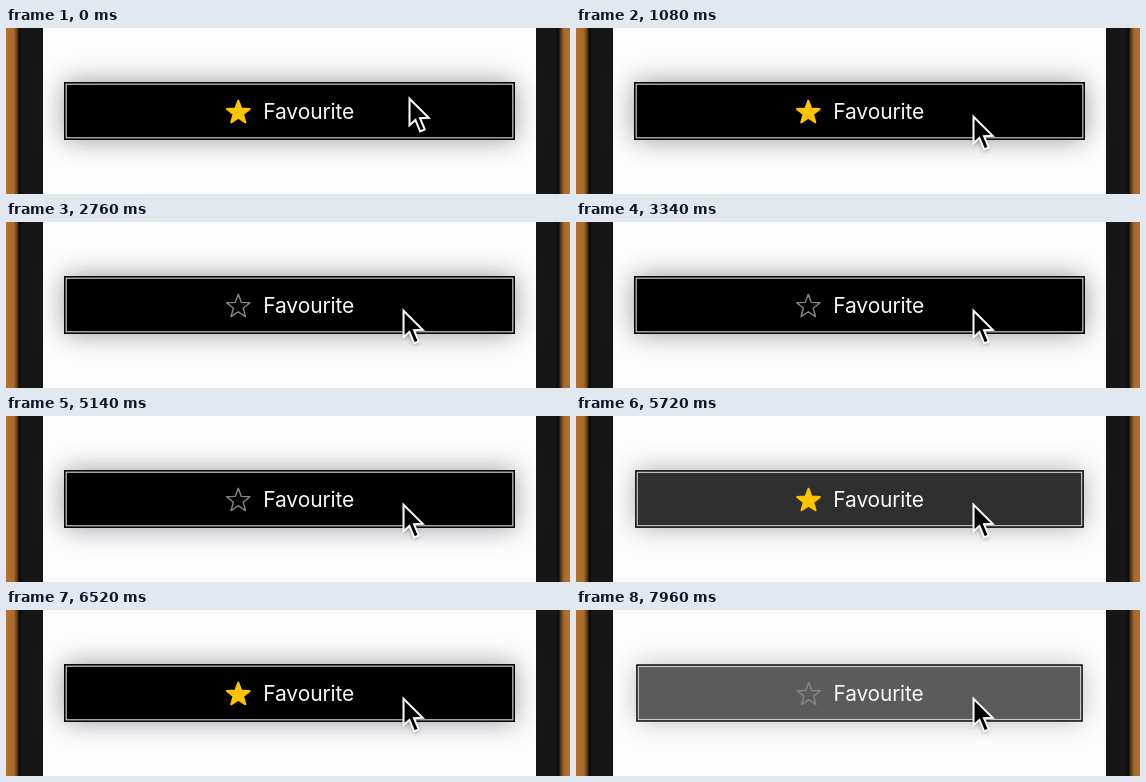
These frames come from a looping animation (564x166 px, 8 s). An HTML page with a canvas:

```html
<!DOCTYPE html>
<html lang="en">
<head>
<meta charset="utf-8">
<title>Favourite button</title>
<style>
  html, body { margin: 0; width: 100%; height: 100%; overflow: hidden; background: #fdfdfd; }
  canvas { display: block; width: 564px; height: 166px; }
</style>
</head>
<body>
<canvas id="stage"></canvas>
<script>
const W = 564, H = 166, LOOP = 8000;
const PAGE = '#fdfdfd', PALE = '#f8f8f8';
const FADE = 200;
const clicks = [
  { down: 2000, up: 2300 },
  { down: 5380, up: 5620 },
  { down: 7700, up: 7940 }
];
const button = { x: 58, y: 54, w: 451, h: 58 };
const arrow = [[1, 2.4], [1, 28.2], [6.7, 23], [11.3, 34.2], [15.8, 32.3], [11.2, 21.3], [19.6, 20.9]];

const canvas = document.getElementById('stage');
const ctx = canvas.getContext('2d');
const dpr = window.devicePixelRatio || 1;
canvas.width = Math.round(W * dpr);
canvas.height = Math.round(H * dpr);

const clamp = v => Math.max(0, Math.min(1, v));
const ease = v => { v = clamp(v); return v * v * (3 - 2 * v); };
const mix = (a, b, k) => a + (b - a) * k;

function pressAt(t) {
  return clicks.reduce((p, c) =>
    Math.max(p, ease((t - c.down) / FADE) - ease((t - c.up) / FADE)), 0);
}

function isFavourite(t) {
  return clicks.filter(c => t >= c.up).length % 2 === 0;
}

function rect(x, y, w, h, fill) {
  ctx.fillStyle = fill;
  ctx.fillRect(x, y, w, h);
}

function polygon(points) {
  ctx.beginPath();
  points.forEach(([x, y]) => ctx.lineTo(x, y));
  ctx.closePath();
}

function drawSides() {
  const strip = ctx.createLinearGradient(0, 0, 37, 0);
  strip.addColorStop(0, '#b4702c');
  strip.addColorStop(0.21, '#aa6a2a');
  strip.addColorStop(0.3, '#5c3a18');
  strip.addColorStop(0.36, '#0c0c0c');
  strip.addColorStop(0.46, '#161616');
  strip.addColorStop(1, '#161616');
  rect(0, 0, 37, H, strip);
  ctx.save();
  ctx.translate(W + 2, 0);
  ctx.scale(-1, 1);
  rect(0, 0, 36, H, strip);
  ctx.restore();
}

function drawStar(cx, cy, filled) {
  const r = filled ? 12 : 12.3;
  const points = Array.from({ length: 10 }, (_, i) => {
    const a = i * Math.PI / 5 - Math.PI / 2;
    const d = i % 2 ? r * 0.42 : r;
    return [cx + d * Math.cos(a), cy + d * Math.sin(a)];
  });
  polygon(points);
  ctx.lineJoin = 'round';
  ctx.lineWidth = filled ? 2 : 1.4;
  ctx.strokeStyle = filled ? '#ffc400' : '#86868c';
  if (filled) {
    ctx.fillStyle = '#ffc400';
    ctx.fill();
  }
  ctx.stroke();
}

function drawButton(press, filled) {
  const { x, y, w, h } = button;
  const face = Math.round(mix(0, 94, press));
  const scale = mix(1, 0.99, press);

  ctx.save();
  ctx.translate(x + w / 2, y + h / 2);
  ctx.scale(scale, scale);
  ctx.translate(-x - w / 2, -y - h / 2);

  ctx.save();
  ctx.shadowColor = `rgba(20,20,40,${mix(0.42, 0.26, press)})`;
  ctx.shadowBlur = 27 * dpr;
  rect(x, y, w, h, '#080808');
  ctx.restore();

  rect(x + 1.5, y + 1.5, w - 3, h - 3, `rgb(${face},${face},${face})`);
  ctx.strokeStyle = '#cacaca';
  ctx.lineWidth = 1.2;
  ctx.strokeRect(x + 2.2, y + 2.2, w - 4.4, h - 4.4);

  drawStar(232.3, 84.6, filled);
  ctx.font = '400 21px Inter, Roboto, sans-serif';
  ctx.letterSpacing = '-0.1px';
  ctx.textBaseline = 'alphabetic';
  ctx.fillStyle = PALE;
  ctx.fillText('Favourite', 257.2, 91.4);
  ctx.restore();
}

function drawCursor(t) {
  const k = ease((t - 20) / 800);
  ctx.save();
  ctx.translate(mix(402, 396, k) + 0.5, mix(68, 86, k) + 0.2);
  ctx.scale(1.03, 1.03);
  polygon(arrow);
  ctx.lineJoin = 'miter';
  ctx.lineWidth = 2;
  ctx.strokeStyle = PALE;
  ctx.fillStyle = '#000';
  ctx.save();
  ctx.shadowColor = 'rgba(0,0,0,.4)';
  ctx.shadowBlur = 4 * dpr;
  ctx.shadowOffsetY = 1.5 * dpr;
  ctx.fill();
  ctx.restore();
  ctx.stroke();
  ctx.restore();
}

function draw(now) {
  const t = now % LOOP;
  ctx.setTransform(dpr, 0, 0, dpr, 0, 0);
  rect(0, 0, W, H, PAGE);
  drawSides();
  drawButton(pressAt(t), isFavourite(t));
  drawCursor(t);
}

let start;
function tick(now) {
  start ??= now;
  draw(now - start);
  requestAnimationFrame(tick);
}
draw(0);
requestAnimationFrame(tick);
</script>
</body>
</html>
```
